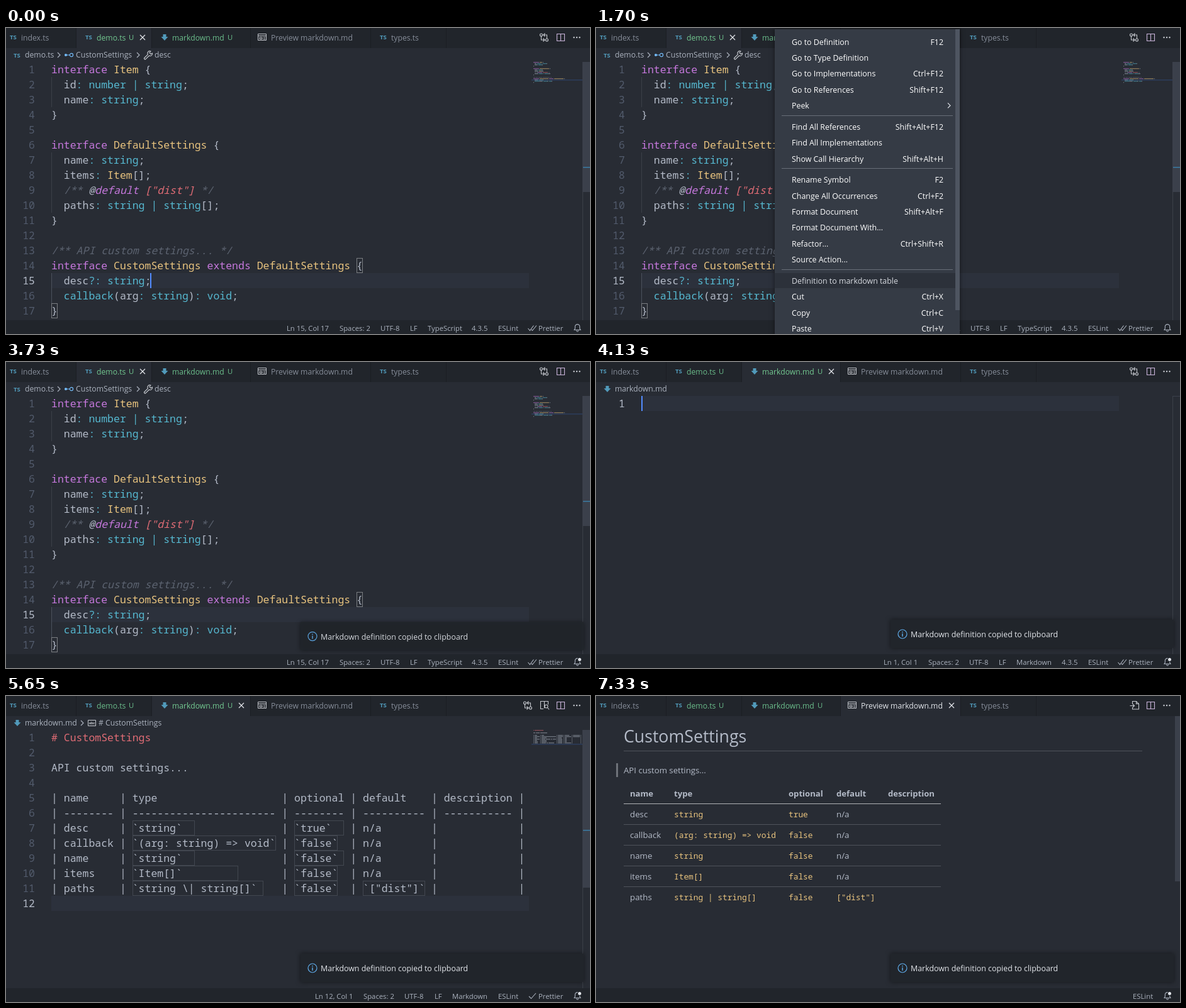
Recreate the animation shown at these times as an HTML page with a canvas. Size 928 by 487 pixels, loop 8000 ms.

```html
<!DOCTYPE html>
<html lang="en">
<head>
<meta charset="utf-8">
<title>Definition to markdown table</title>
<style>
html, body { margin: 0; width: 100%; height: 100%; overflow: hidden; background: #282c34; }
canvas { display: block; }
</style>
</head>
<body>
<canvas id="stage" width="928" height="487"></canvas>
<script>
const ctx = document.getElementById('stage').getContext('2d');
const LOOP = 8000, CHAR = 9.9, LEFT = 72, TOP = 54, ROW = 24;
const BG = '#282c34', DARK = '#21252b', FG = '#b4bbc8', DIM = '#abb2be', BRIGHT = '#e2e5ea',
  PURPLE = '#c678dd', YELLOW = '#e9c47f', CYAN = '#56b8d0', RED = '#e06c75', GREY = '#5c6370',
  GREEN = '#73c991', BLUE = '#519aba', GUIDE = '#3b4048';
const mono = size => `500 ${size}px "Noto Sans Mono", monospace`;
const sans = size => `${size}px "Open Sans", sans-serif`;
const CODE = mono(16.5), UI = sans(12.2), MENU = sans(12.4), STATUS = sans(11.3);

const source = `interface Item {
  id: number | string;
  name: string;
}

interface DefaultSettings {
  name: string;
  items: Item[];
  /** @default ["dist"] */
  paths: string | string[];
}

/** API custom settings... */
interface CustomSettings extends DefaultSettings {
  desc?: string;
  callback(arg: string): void;
}`.split('\n');

const header = ['name', 'type', 'optional', 'default', 'description'];
const rows = [
  ['desc', 'string', 'true', 'n/a'],
  ['callback', '(arg: string) => void', 'false', 'n/a'],
  ['name', 'string', 'false', 'n/a'],
  ['items', 'Item[]', 'false', 'n/a'],
  ['paths', 'string | string[]', 'false', '["dist"]']
];
const isCode = (cell, col) => col === 1 || col === 2 || cell[0] === '[';
const widths = [8, 23, 8, 10, 11];
// Code boxes keep outdated widths for a moment after formatting
const staleType = [10, 23, 10, 17, 21], staleOptional = [8, 7, 8, 7, 7];

const mdCells = rows.map(r => [...r.map((c, i) => isCode(c, i) ? '`' + c.replace('|', '\\|') + '`' : c), '']);
function markdown(formatted) {
  const join = cells => '| ' + cells.map((c, i) => formatted ? c.padEnd(widths[i]) : c).join(' | ') + ' |';
  return ['# CustomSettings', '', 'API custom settings...', '', join(header),
    join(widths.map(w => '-'.repeat(formatted ? w : 1))), ...mdCells.map(join), ''];
}
const rawTable = markdown(false), niceTable = markdown(true);

function rect(x, y, w, h, color) { ctx.fillStyle = color; ctx.fillRect(x, y, w, h); }
function text(s, x, y, color = DIM, font = UI, align = 'left') {
  ctx.font = font; ctx.fillStyle = color; ctx.textAlign = align;
  ctx.fillText(s, x, y);
}
function stroke(d, color = '#c5c8ce', width = 1.1) {
  ctx.strokeStyle = color; ctx.lineWidth = width;
  ctx.stroke(new Path2D(d));
}
function fill(d, color) { ctx.fillStyle = color; ctx.fill(new Path2D(d)); }
const ring = (x, y, r) => `M${x - r} ${y}a${r} ${r} 0 1 0 ${2 * r} 0a${r} ${r} 0 1 0 ${-2 * r} 0`;
const cross = (x, y) => stroke(`M${x - 4} ${y - 4}l8 8m0 -8l-8 8`, BRIGHT, 1.2);
const chevron = (x, y, color = DIM) => stroke(`M${x - 2} ${y - 4}l4 4l-4 4`, color, 1.2);
const tsIcon = (x, y) => text('TS', x, y, BLUE, 'bold ' + sans(9.6));
const mdIcon = (x, y) => fill(`M${x - 2.5} ${y - 5}h5v4h3l-5.5 6l-5.5 -6h3z`, BLUE);

// Splits a line into [text, column, color, italic]
function tokens(line, isMarkdown) {
  if (isMarkdown) return [[line, 0, line[0] === '#' ? RED : FG]];
  const comment = line.includes('/**');
  return [...line.matchAll(/\["dist"\]|\w+|\S/g)].map(({ 0: s, index }) => {
    let color = FG;
    if (s === 'default') color = PURPLE;
    else if (s[1] === '"') color = RED;
    else if (comment) color = s === '@' ? FG : GREY;
    else if (/^(interface|extends)$/.test(s)) color = PURPLE;
    else if (/^(string|number|void|callback|[?:|])$/.test(s)) color = CYAN;
    else if (/^[A-Z]/.test(s)) color = YELLOW;
    return [s, index, color, comment];
  });
}

function drawLines(lines, current, isMarkdown) {
  const lineTop = TOP + (current - 1) * ROW;
  rect(LEFT, lineTop, 759, ROW, '#2c313c');
  lines.forEach((line, i) => {
    const y = TOP + i * ROW;
    text(i + 1, 46, y + 18, i + 1 === current ? FG : '#525b6c', CODE, 'right');
    if (!isMarkdown && line[0] === ' ') rect(LEFT, y, 1, ROW, i > 12 ? '#4b515c' : GUIDE);
    for (const [s, col, color, italic] of tokens(line, isMarkdown)) {
      text(s, LEFT + col * CHAR, y + 18, color, (italic ? 'italic ' : '') + CODE);
    }
  });
}

function drawMinimap(lines, current, isMarkdown) {
  rect(835, TOP + (current - 1) * 2, 81, 1.5, '#2c3d5c');
  ctx.globalAlpha = 0.5;
  lines.forEach((line, i) => {
    for (const [s, col, color] of tokens(line, isMarkdown))
      for (let k = 0; k < s.length; k++)
        if (s[k] !== ' ') rect(838 + col + k, TOP + i * 2, 1, 1.3, color);
  });
  ctx.globalAlpha = 1;
}

function drawRuler(thumb, mark) {
  rect(916, TOP, 1, 411, GUIDE);
  rect(916, TOP, 12, thumb || 1, '#3b404b');
  if (mark) rect(917, mark, 11, 1.5, '#3a7ca5');
}

function drawTabs(active, dirty) {
  rect(0, 0, 928, 32, DARK);
  const edges = [0, 112, 232, 389, 580, 700];
  for (let i = 0; i < 5; i++) {
    if (i === active) rect(edges[i], 0, edges[i + 1] - edges[i] - 1, 32, BG);
    rect(edges[i + 1] - 1, 0, 1, 32, '#1b1e23');
  }
  const inactive = '#868d99', label = i => i === active ? BRIGHT : inactive;
  const git = i => i === active ? GREEN : '#6bbd8b';
  tsIcon(6, 18); text('index.ts', 24, 20, inactive);
  tsIcon(126, 18); text('demo.ts', 144, 20, git(1)); text('U', 195, 19, git(1), STATUS);
  mdIcon(252, 15); text('markdown.md', 264, 20, git(2)); text('U', 352, 19, git(2), STATUS);
  stroke('M400.5 9.5h13v10h-13zM400 12.5h13M403 15h4v2.500h-4zM409 15h3M409 17.500h3', '#c5c8ce', 1);
  text('Preview markdown.md', 421, 20, label(3));
  tsIcon(594, 18); text('types.ts', 612, 20, inactive);
  if (active === 2 && dirty) fill(ring(374, 15, 4), BRIGHT);
  else cross([0, 217, 374, 565][active], 15);
}

const compareIcon = x => stroke(ring(x - 4.5, 11, 2) + ring(x + 4.5, 19, 2) +
  `M${x - 4.5} 13v6h5m-2 -2.500l2.500 2.500l-2.500 2.500M${x + 4.5} 17v-6h-5m2 -2.500l-2.500 2.500l2.500 2.500`);
function drawActions(view) {
  if (view === 'code') compareIcon(855);
  if (view === 'markdown') {
    compareIcon(829);
    stroke('M854 20.500h-4.500v-12h12v5M855.500 8.500v11' + ring(858.5, 16.5, 2.5) + 'M860.500 18.500l2.500 3');
  }
  if (view === 'preview') {
    stroke('M852.500 13v-4.500h6l4 4v8.500h-10v-3M858.500 8.500v4h4M848.500 15.500h7m-2.500 -2.500l2.500 2.500l-2.500 2.500');
  }
  stroke('M875.500 9.500h12v11h-12zM881.500 9.500v11', '#c9b3d9');
  for (let i = 0; i < 3; i++) fill(ring(902.5 + i * 4.5, 15, 1.2), '#c5c8ce');
}

function drawCodeCrumbs() {
  tsIcon(12, 47); text('demo.ts', 30, 47);
  chevron(84, 43);
  fill(ring(95, 43, 2), '#75beff');
  stroke('M95 43h6' + ring(104, 43, 2.6), '#75beff');
  text('CustomSettings', 111, 47);
  chevron(210, 43);
  stroke('M219.500 48l6 -6a3.500 3.500 0 0 1 4.500 -5l-2 2.500l2 2l2.500 -1.500a3.500 3.500 0 0 1 -5 4l-6 6q-2 0 -2 -2z', '#c5c8ce');
  text('desc', 236, 47);
}
function drawMarkdownCrumbs(withHeading) {
  mdIcon(18, 43); text('markdown.md', 30, 47);
  if (!withHeading) return;
  chevron(121, 43);
  stroke('M130.500 38.500h12v9h-12z', '#c5c8ce', 1);
  text('abc', 136.5, 45, '#c5c8ce', 'bold ' + sans(5.5), 'center');
  text('# CustomSettings', 147, 47);
}

function drawStatus(items, check, bellDot) {
  rect(0, 465, 928, 22, DARK);
  for (const [s, x] of items) text(s, x, 482, DIM, STATUS);
  if (check) {
    stroke(check === 2 ? 'M829.500 478l3 3.500l6 -8M835 480l1.500 1.500l6.500 -8' : 'M831 478l3.500 3.500l7.500 -8.500', DIM);
    text('Prettier', 846, 482, DIM, STATUS);
  }
  stroke('M903 480.500h10l-1.300 -2.200v-3a3.700 3.700 0 0 0 -7.400 0v3zM906.500 481.500a1.500 1.500 0 0 0 3 0', DIM);
  if (bellDot) { fill(ring(911.5, 473.5, 3.5), DARK); fill(ring(911.5, 473.5, 2.5), BRIGHT); }
}

function drawCursor(line, x = LEFT) { rect(x, TOP + (line - 1) * ROW, 2, ROW, '#528bff'); }

const menu = [
  ['Go to Definition', 'F12'], ['Go to Type Definition'], ['Go to Implementations', 'Ctrl+F12'],
  ['Go to References', 'Shift+F12'], ['Peek', '>'], null,
  ['Find All References', 'Shift+Alt+F12'], ['Find All Implementations'],
  ['Show Call Hierarchy', 'Shift+Alt+H'], null,
  ['Rename Symbol', 'F2'], ['Change All Occurrences', 'Ctrl+F2'], ['Format Document', 'Shift+Alt+F'],
  ['Format Document With...'], ['Refactor...', 'Ctrl+Shift+R'], ['Source Action...'], null,
  ['Definition to markdown table'], ['Cut', 'Ctrl+X'], ['Copy', 'Ctrl+C'], ['Paste', 'Ctrl+V']
];
function panel(x, y, w, h, color) {
  ctx.shadowColor = 'rgba(0,0,0,.5)'; ctx.shadowBlur = 7;
  rect(x, y, w, h, color);
  ctx.shadowBlur = 0;
}
function drawMenu(alpha) {
  ctx.globalAlpha = alpha;
  panel(284, 2, 294, 500, '#353b45');
  let y = 22;
  for (const item of menu) {
    if (!item) { rect(295, Math.round(y - 9.9), 272, 1, '#686e78'); y += 8.45; continue; }
    const [label, keys] = item, chosen = label.startsWith('Definition');
    const baseline = Math.round(y + 4.7);
    if (chosen) rect(284, 390, 287, 24, '#2c313a');
    text(label, 311, baseline, chosen ? '#d7dae0' : '#fff', MENU);
    if (keys === '>') chevron(561, y, BRIGHT);
    else if (keys) text(keys, 552, baseline, '#fff', MENU, 'right');
    y += 25.35;
  }
  rect(571, 2, 7, 447, '#4e5561');
  ctx.globalAlpha = 1;
}

function drawToast(progress) {
  const eased = 1 - (1 - progress) ** 2.5;
  ctx.save();
  ctx.beginPath(); ctx.rect(460, 402, 468, 62); ctx.clip();
  ctx.globalAlpha = eased;
  ctx.translate(0, 46 * (1 - eased));
  panel(468, 410, 450, 45, DARK);
  stroke(ring(487, 433, 7), '#61afef', 1.2);
  rect(486.3, 429, 1.4, 1.6, '#61afef');
  rect(486.3, 432, 1.4, 5, '#61afef');
  text('Markdown definition copied to clipboard', 500, 438, BRIGHT, MENU);
  ctx.restore();
}

function drawCodeBoxes(t) {
  mdCells.forEach((cells, r) => {
    let col = 2;
    cells.forEach((cell, c) => {
      let length = cell.length;
      if (t >= 5650 && t < 5850) length = c === 1 ? staleType[r] : c === 2 ? staleOptional[r] : length;
      if (cell[0] === '`') {
        ctx.strokeStyle = '#424750'; ctx.lineWidth = 1;
        ctx.strokeRect(Math.round(LEFT + col * CHAR) + 0.5, TOP + (r + 6) * ROW + 0.5, Math.round(length * CHAR) - 1, ROW - 1);
      }
      col += (t < 5650 ? cell.length : widths[c]) + 3;
    });
  });
}

function codeView(t) {
  drawTabs(1); drawActions('code'); drawCodeCrumbs();
  drawLines(source, 15, false);
  ctx.strokeStyle = '#7b7e82'; ctx.lineWidth = 1;
  ctx.strokeRect(557.5, 366.5, 9, 23);
  ctx.strokeRect(72.5, 438.5, 9, 23);
  drawMinimap(source, 15, false);
  drawRuler(207, 221);
  if (t < 200 || (t >= 680 && t < 960) || (t >= 3120 && t < 3520)) drawCursor(15, 229);
  drawStatus([['Ln 15, Col 17', 446], ['Spaces: 2', 530], ['UTF-8', 595], ['LF', 642],
    ['TypeScript', 670], ['4.3.5', 740], ['ESLint', 782]], 2, t >= 3520);
  if (t >= 1130 && t < 3120) drawMenu(Math.min(1, 0.4 + (t - 1130) / 130));
}

function markdownView(t) {
  const pasted = t >= 4910, formatted = t >= 5650, current = pasted ? 12 : 1;
  const lines = pasted ? (formatted ? niceTable : rawTable) : [''];
  drawTabs(2, pasted && !formatted);
  drawActions(t < 4170 ? 'code' : 'markdown');
  drawMarkdownCrumbs(t >= 5280);
  drawLines(lines, current, true);
  if (t >= 5160) drawCodeBoxes(t);
  if (pasted) drawMinimap(lines, current, true);
  drawRuler(pasted ? 251 : 0, pasted ? 213 : 0);
  if (t < 4660 || (pasted && t < 5450) || (t >= 5850 && t < 6410) || t >= 6940) drawCursor(current);
  const settled = t >= 4210;
  drawStatus([[`Ln ${current}, Col 1`, settled ? (pasted ? 491 : 497) : 457],
    ['Spaces: 2', settled ? 568 : 528], ['UTF-8', settled ? 633 : 593], ['LF', settled ? 681 : 640],
    ['Markdown', settled ? 709 : 668], [settled ? '' : '4.3.5', 740], ['ESLint', 782]], formatted ? 1 : 2, true);
}

function previewView(t) {
  drawTabs(3); drawActions('preview');
  drawStatus([['ESLint', 853]], 0, true);
  if (t < 7300) return;
  const columns = [54, 124, 306, 382, 464];
  text('CustomSettings', 44, 74, FG, sans(26.7));
  rect(44, 87, 824, 1, '#4f535b');
  rect(32, 107, 3, 22, '#6e7279');
  text('API custom settings...', 44, 123, FG, sans(13.2));
  header.forEach((s, c) => text(s, columns[c], 160, FG, 'bold ' + sans(13.1)));
  rect(44, 171, 504, 1, '#b0b2b6');
  rows.forEach((cells, r) => {
    const y = 193 + r * 33;
    cells.forEach((s, c) => isCode(s, c) ? text(s, columns[c], y, YELLOW, mono(12.85)) : text(s, columns[c], y, FG, sans(13.3)));
    if (r < 4) rect(44, y + 11, 504, 1, '#4f535b');
  });
  rect(920, 32, 8, 263, '#3b404b');
}

function draw(now) {
  const t = now % LOOP;
  rect(0, 0, 928, 487, BG);
  (t < 4130 ? codeView : t < 7270 ? markdownView : previewView)(t);
  if (t >= 3520) drawToast(Math.min(1, (t - 3520) / 330));
}

const start = performance.now();
function tick() {
  draw(performance.now() - start);
  requestAnimationFrame(tick);
}
tick();
</script>
</body>
</html>
```
